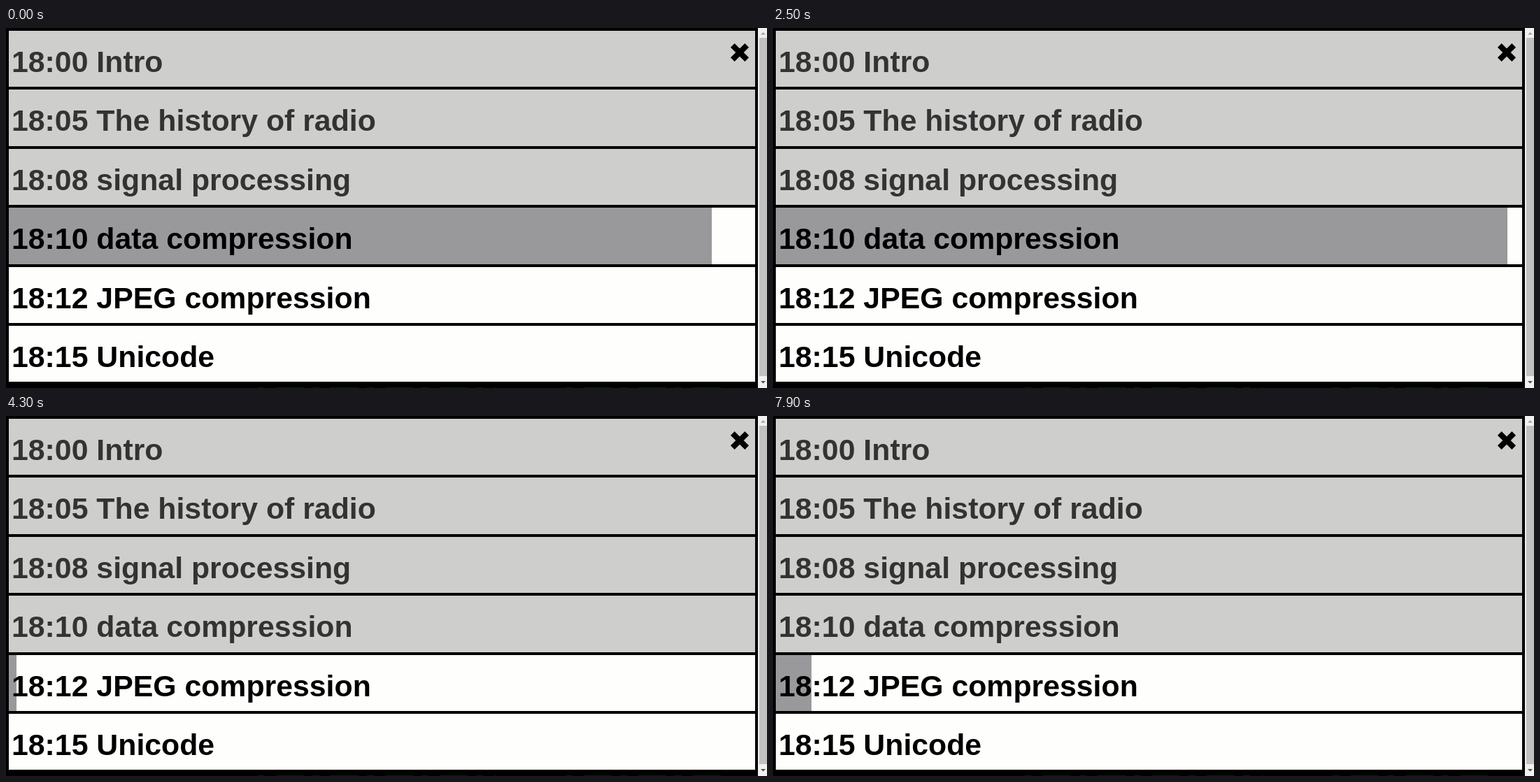
An HTML page that plays this animation: 1088 by 515 pixels, repeating every 8 s.

```html
<!DOCTYPE html>
<html lang="en">
<head>
<meta charset="utf-8">
<title>Programme</title>
<style>
  html, body { margin: 0; width: 100%; height: 100%; overflow: hidden; background: #000; }
  svg { display: block; width: 1088px; height: 515px; }
  text { font: bold 42.8px "Liberation Sans", Arial, sans-serif; white-space: pre; }
</style>
</head>
<body>
<svg id="stage" viewBox="0 0 1088 515">
  <rect width="1088" height="515" fill="#000"/>
  <path d="M360 514.5H700M800 514.5H1030" stroke="#06200c" stroke-dasharray="10 16 40 12"/>
  <g id="rows"></g>
  <path d="M1038.8 24.8l20.4 20.4M1059.2 24.8l-20.4 20.4" stroke="#000" stroke-width="8"/>
  <rect x="1075" width="13" height="515" fill="#f1f1f1"/>
  <rect x="1077" y="14" width="11" height="484" fill="#c1c1c1"/>
  <path d="M1079 9.5l3.5-3.5 3.5 3.5z" fill="#a3a3a3"/>
  <path d="M1079 505l3.5 3.5 3.5-3.5z" fill="#505050"/>
</svg>
<script>
const LOOP = 8000, STEP = 100, SWITCH = 3300;
const LEFT = 4, RIGHT = 1071, TOP = 4, PITCH = 84.4, ROW_HEIGHT = 80.4;
const titles = [
  "18:00 Intro",
  "18:05 The history of radio",
  "18:08 signal processing",
  "18:10 data compression",
  "18:12 JPEG compression",
  "18:15 Unicode"
];

function add(parent, tag, attributes) {
  const node = document.createElementNS("http://www.w3.org/2000/svg", tag);
  for (const name in attributes) node.setAttribute(name, attributes[name]);
  return parent.appendChild(node);
}

const group = document.getElementById("rows");
const rows = titles.map((title, i) => {
  const y = Math.round(TOP + PITCH * i);
  const height = Math.round(TOP + PITCH * i + ROW_HEIGHT) - y;
  const back = add(group, "rect", { x: LEFT, y, width: RIGHT - LEFT, height });
  const bar = add(group, "rect", { x: LEFT, y, width: 0, height, fill: "#99989a" });
  const label = add(group, "text", { x: 8, y: 63 + PITCH * i });
  label.textContent = title;
  return { back, bar, label };
});

function draw(time) {
  const t = Math.floor(time / STEP) * STEP;
  const active = t < SWITCH ? 3 : 4;
  const edge = t < SWITCH
    ? 1008.55 + 0.01656 * t
    : 4.37 + 0.0111 * (t - SWITCH);
  rows.forEach(({ back, bar, label }, i) => {
    const done = i < active;
    back.setAttribute("fill", done ? "#cececc" : "#fefefc");
    label.setAttribute("fill", done ? "#333" : "#000");
    bar.setAttribute("width", i === active ? Math.round(edge) - LEFT : 0);
  });
}

const start = performance.now();
function tick() {
  draw((performance.now() - start) % LOOP);
  requestAnimationFrame(tick);
}
tick();
</script>
</body>
</html>
```
